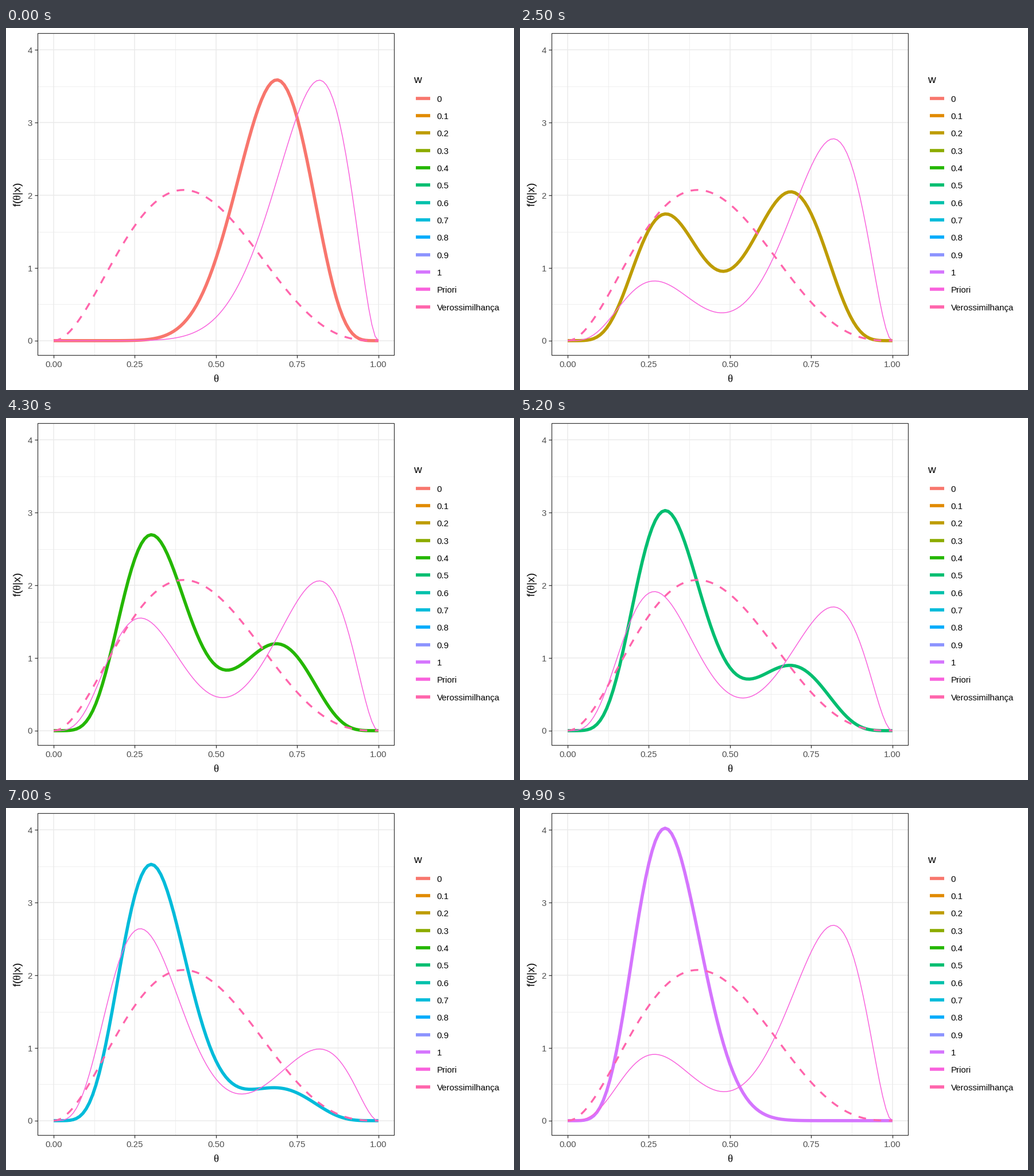
Write a matplotlib script that moves like this. It is 885x632 px and loops after 10 s.

```python
import math

import matplotlib.pyplot as plt
import numpy as np
from matplotlib.animation import FuncAnimation
from matplotlib.patches import Rectangle

plt.rcParams.update({
    "font.family": "Liberation Sans",
    "path.simplify": False,
    "mathtext.fontset": "custom",
    "mathtext.rm": "Liberation Sans",
    "mathtext.it": "Liberation Serif",
})

WIDTH, HEIGHT, DPI = 885, 632, 100
PX = 72 / DPI
LEFT, RIGHT, TOP, BOTTOM = 54.8, 677.0, 9.7, 571.4
X_UNIT = (RIGHT - LEFT) / 1.1
PALETTE = ["#F8766D", "#E18A00", "#BE9C00", "#8CAB00", "#24B700", "#00BE70",
           "#00C1AB", "#00BBDA", "#00ACFC", "#8B93FF", "#D575FE", "#F962DD",
           "#FF65AC"]
LABELS = ["0"] + [f"0.{i}" for i in range(1, 10)] + ["1", "Priori", "Verossimilhança"]
INK, GRID, TICK_TEXT = "#333333", "#EBEBEB", "#4D4D4D"
THICK, MEDIUM, THIN = 5.6, 3.34, 1.5

theta = np.linspace(0, 1, 101)


def beta_const(a, b):
    return math.gamma(a + b) / (math.gamma(a) * math.gamma(b))


def beta_pdf(a, b):
    return beta_const(a, b) * theta ** (a - 1) * (1 - theta) ** (b - 1)


# Two beta priors updated with 2 successes in 5 trials.
low_prior, high_prior = beta_pdf(5, 12), beta_pdf(10, 3)
low_post, high_post = beta_pdf(7, 15), beta_pdf(12, 6)
low_evidence = beta_const(5, 12) / beta_const(7, 15)
high_evidence = beta_const(10, 3) / beta_const(12, 6)
likelihood = beta_pdf(3, 4)
Y_UNIT = (BOTTOM - TOP) / (1.1 * low_post.max())


def prior(w):
    return w * low_prior + (1 - w) * high_prior


def posterior(w):
    low, high = w * low_evidence, (1 - w) * high_evidence
    return (low * low_post + high * high_post) / (low + high)


def sx(x):
    return LEFT + X_UNIT * (x + 0.05)


def sy(y):
    return BOTTOM - 0.05 * Y_UNIT * low_post.max() - Y_UNIT * y


fig = plt.figure(figsize=(WIDTH / DPI, HEIGHT / DPI), dpi=DPI, facecolor="white")
ax = fig.add_axes([0, 0, 1, 1])
ax.set(xlim=(0, WIDTH), ylim=(HEIGHT, 0))
ax.axis("off")


def line(x, y, color, width, z=1, **kw):
    return ax.plot(x, y, color=color, lw=width * PX, zorder=z,
                   solid_capstyle="butt", dash_capstyle="butt",
                   solid_joinstyle="round", **kw)[0]


def label(x, y, text, size=15, color="black", **kw):
    kw.setdefault("va", "baseline")
    ax.text(x, y, text, fontsize=size * PX, color=color, **kw)


def vertical(x, width):
    line([sx(x)] * 2, [TOP, BOTTOM], GRID, width)


def horizontal(y, width):
    line([LEFT, RIGHT], [sy(y)] * 2, GRID, width)


for i in range(4):
    vertical(0.125 + i / 4, 0.8)
    horizontal(0.5 + i, 0.8)
for i in range(5):
    vertical(i / 4, 1.5)
    horizontal(i, 1.5)
    line([sx(i / 4)] * 2, [BOTTOM, BOTTOM + 4.8], INK, 1.3)
    line([LEFT - 4.8, LEFT], [sy(i)] * 2, INK, 1.3)
    label(sx(i / 4), 592.5, f"{i / 4:.2f}", color=TICK_TEXT, ha="center")
    label(46, sy(i) + 5.6, str(i), color=TICK_TEXT, ha="right")

ax.add_patch(Rectangle((LEFT, 9), 676.4 - LEFT, BOTTOM - 9, fill=False,
                       ec=INK, lw=1.2 * PX, zorder=6))
label(366, 617.5, "θ", 19, ha="center", family="Liberation Serif")
label(21.5, 290.5, r"$\mathrm{f(}\mathit{\theta}\mathrm{|x)}$", 19,
      ha="center", va="center", rotation=90)

label(710.5, 96, "w", 19)
for i, (name, color) in enumerate(zip(LABELS, PALETTE)):
    y = 122.7 + 30.33 * i
    line([713.5, 738.5], [y, y], color, THICK)
    label(750.5, y + 6, name)

posterior_line = line(sx(theta), sy(posterior(0)), PALETTE[0], THICK, 3)
prior_line = line(sx(theta), sy(prior(0)), PALETTE[11], THIN, 4)
line(sx(theta), sy(likelihood), PALETTE[12], MEDIUM, 5, linestyle=(0, (4, 4)))

# Frame at which each weight is reached, and how many frames the move takes.
ARRIVALS = [0, 9, 19] + list(range(28, 92, 9)) + [100]
MOVES = [0, 5, 5] + [4] * 9
knot_times, knot_weights = [0], [0.0]
for k in range(1, 12):
    knot_times += [ARRIVALS[k] - MOVES[k], ARRIVALS[k]]
    knot_weights += [(k - 1) / 10, (k % 11) / 10]


def update(n):
    state = sum(a <= n for a in ARRIVALS) - 1
    w = np.interp(n, knot_times, knot_weights)
    prior_line.set_ydata(sy(prior(w)))
    posterior_line.set_ydata(sy(posterior(state / 10)))
    posterior_line.set_color(PALETTE[state])
    return prior_line, posterior_line


anim = FuncAnimation(fig, update, frames=100, interval=100, repeat=True,
                     repeat_delay=0, blit=False)
plt.show()
```
